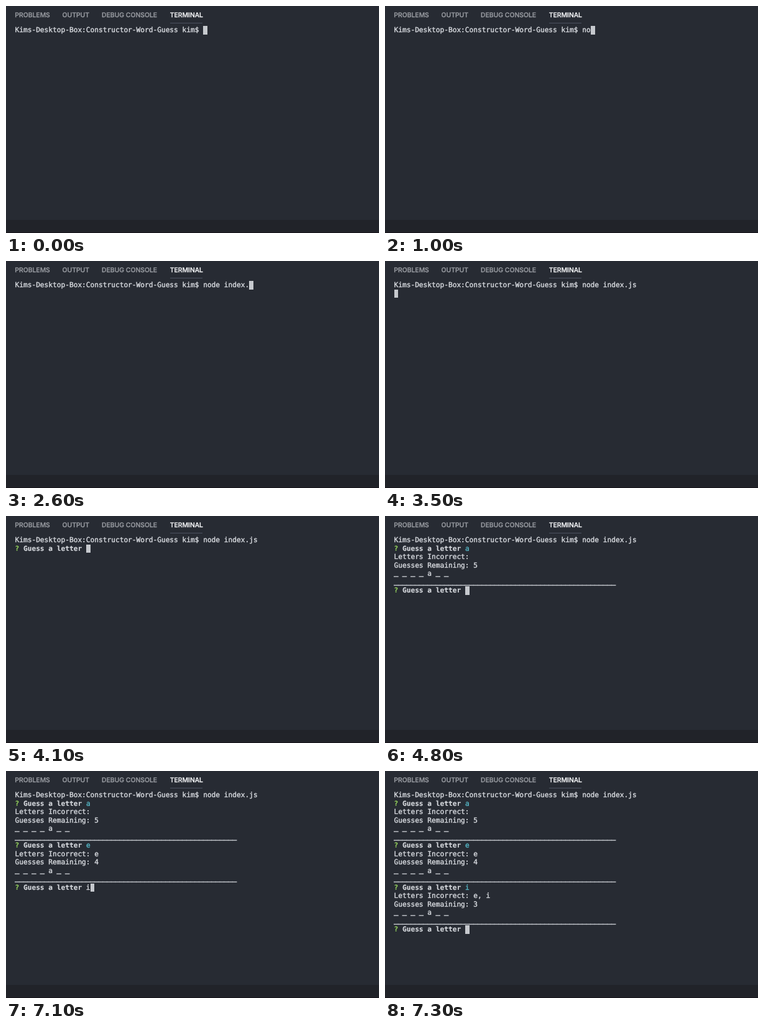
Recreate the animation shown at these times as an HTML page. Size 600 by 365 pixels, loop 8000 ms.

```html
<!DOCTYPE html>
<html lang="en">
<head>
<meta charset="utf-8">
<title>Terminal word game</title>
<style>
  html, body { margin: 0; width: 100%; height: 100%; overflow: hidden; background: #272b33; }
  body { position: relative; text-rendering: geometricPrecision; }
  .tab { position: absolute; top: 8px; font: 500 10.4px/13px Inter, sans-serif; color: #999ca2; white-space: pre;
    -webkit-text-stroke: .3px; }
  .tab.on { color: #f4f5f7; }
  #mark { position: absolute; left: 264px; top: 27px; width: 52px; height: 1px; background: #4b5260; }
  #bar { position: absolute; left: 0; right: 0; top: 344px; height: 20px; background: #212329; border-bottom: 1px solid #17151a; }
  #screen { position: absolute; left: 14.5px; top: 32.3px; margin: 0; color: #d5d8dd; white-space: pre;
    font: 11.18px/13.5px "DejaVu Sans Mono", monospace; -webkit-text-stroke: .4px; }
  #screen b { -webkit-text-stroke: .15px; }
  .q { color: #93cf5c; }
  .a { color: #55b5c4; }
  .u { position: relative; top: -1.2px; color: #c3c6cb; -webkit-text-stroke: 1px; }
  #cursor { position: absolute; width: 6.7px; height: 13.4px; background: #c6c9ce; }
</style>
</head>
<body>
<div class="tab" style="left:14.3px">PROBLEMS</div>
<div class="tab" style="left:90.5px">OUTPUT</div>
<div class="tab" style="left:154px">DEBUG CONSOLE</div>
<div class="tab on" style="left:263.8px">TERMINAL</div>
<div id="mark"></div>
<pre id="screen"></pre>
<div id="cursor"></div>
<div id="bar"></div>
<script>
const LOOP = 8000, CELL = 6.731, ROW = 13.5;
const PROMPT = 'Kims-Desktop-Box:Constructor-Word-Guess kim$ ';
const COMMAND = 'node index.js';
const keys = [800, 1000, 1100, 1200, 1500, 1700, 2000, 2100, 2300, 2500, 2600, 2800, 3000];
const RUN = 3500, ASK = 4100;
const rounds = [
  { letter: 'a', typed: 4200, enter: 4400, wrong: '', left: 5 },
  { letter: 'e', typed: 5800, enter: 6000, wrong: 'e', left: 4 },
  { letter: 'i', typed: 7000, enter: 7200, wrong: 'e, i', left: 3 }
];
const screenEl = document.getElementById('screen');
const cursorEl = document.getElementById('cursor');
const question = '<b><span class="q">?</span> Guess a letter</b> ';
const lines = s => s.replace(/_+/g, '<span class="u">$&</span>');

function stateAt(t) {
  const command = COMMAND.slice(0, keys.filter(k => k <= t).length);
  const rows = [PROMPT + command];
  let col = rows[0].length;
  if (t >= RUN) {
    rows.push('');
    col = 0;
  }
  if (t >= ASK) {
    rows[1] = question;
    col = 17;
    for (const r of rounds) {
      if (t < r.typed) break;
      const last = rows.length - 1;
      if (t < r.enter) {
        rows[last] += r.letter;
        col++;
        break;
      }
      rows[last] += `<span class="a">${r.letter}</span>`;
      rows.push('Letters Incorrect: ' + r.wrong, 'Guesses Remaining: ' + r.left,
        lines('_ _ _ _ a _ _'), lines('_'.repeat(53)), question);
    }
  }
  return { html: rows.join('\n'), col, row: rows.length - 1 };
}

let shown;
function draw(now) {
  const { html, col, row } = stateAt(now % LOOP);
  if (html !== shown) {
    screenEl.innerHTML = shown = html;
    cursorEl.style.left = 14.5 + col * CELL + 'px';
    cursorEl.style.top = 32.3 + row * ROW + 'px';
  }
  requestAnimationFrame(draw);
}
draw(0);
</script>
</body>
</html>
```
